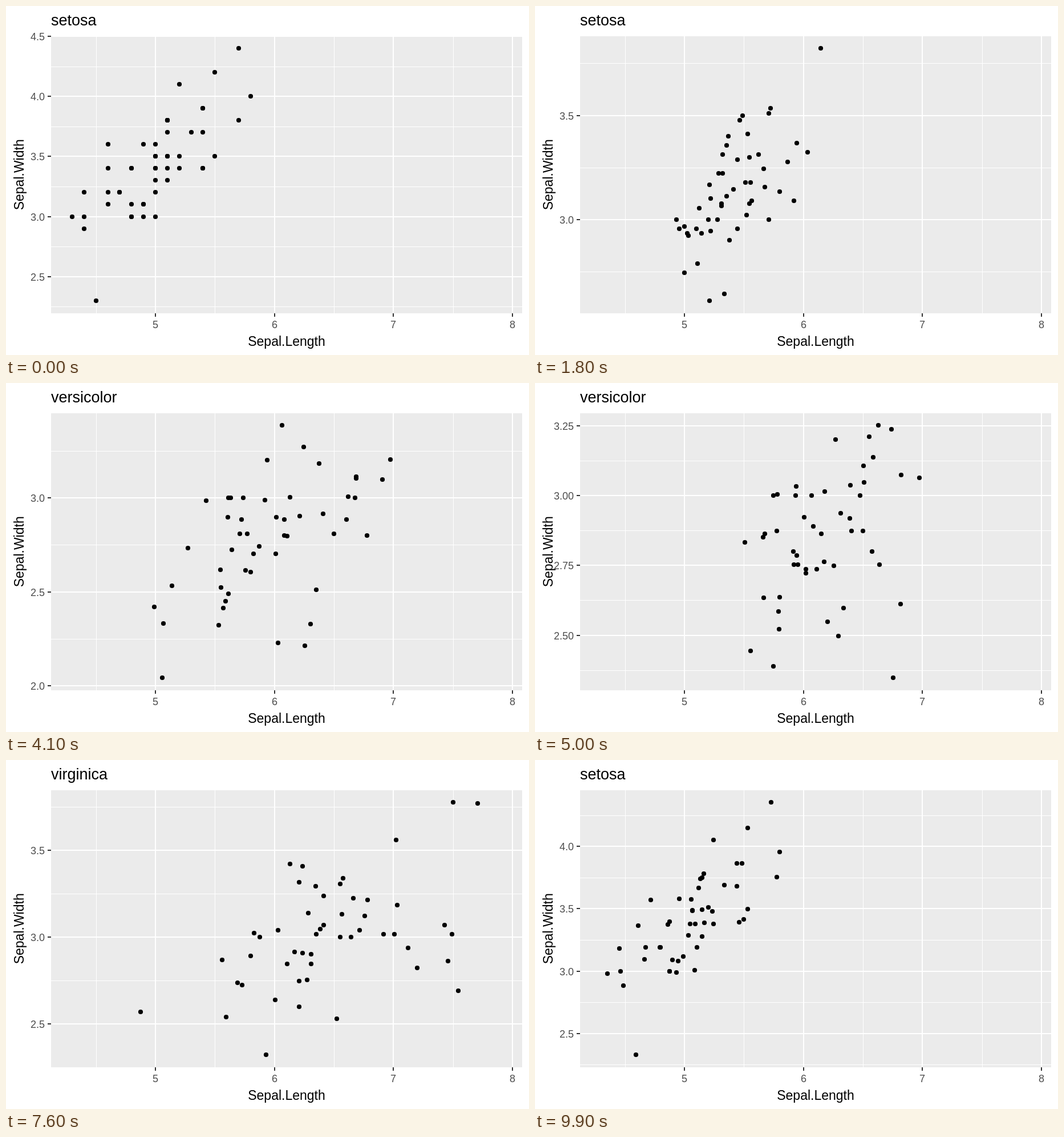
These frames come from a looping animation (917x611 px, 10 s). An HTML page:

```html
<!DOCTYPE html>
<html lang="en">
<head>
<meta charset="utf-8">
<title>Sepal scatter plot</title>
<style>
  html, body { margin: 0; width: 100%; height: 100%; overflow: hidden; background: #fff; }
  svg { display: block; font-family: "Liberation Sans", Arial, sans-serif; }
  .label { font-size: 18px; fill: #4d4d4d; }
  .name { font-size: 23px; text-anchor: middle; }
  .mid { text-anchor: middle; }
  .end { text-anchor: end; }
  .grid { fill: #fff; }
  .tick { fill: #333; }
</style>
</head>
<body>
<svg width="917" height="611" viewBox="0 0 917 611">
  <text id="title" x="79" y="34" font-size="27"></text>
  <rect x="79" y="53" width="826" height="485" fill="#ebebeb"/>
  <g id="minor" class="grid"></g>
  <g id="xAxis"></g>
  <g id="yAxis"></g>
  <g id="dots"></g>
  <text class="name" x="492" y="595">Sepal.Length</text>
  <text class="name" transform="translate(30.5 295.3) rotate(-90)">Sepal.Width</text>
</svg>
<script>
// Measurements in tenths, one entry per flower.
const setosaLength = [
  51,49,47,46,50,54,46,50,44,49,54,48,48,43,58,57,54,51,57,51,54,51,46,51,48,
  50,50,52,52,47,48,54,52,55,49,50,55,49,44,51,50,45,44,50,51,48,51,46,53,50];
const setosaWidth = [
  35,30,32,31,36,39,34,34,29,31,37,34,30,30,40,44,39,35,38,38,34,37,36,33,34,
  30,34,35,34,32,31,34,41,42,31,32,35,36,30,34,35,23,32,35,38,30,38,32,37,33];
const versicolorLength = [
  70,64,69,55,65,57,63,49,66,52,50,59,60,61,56,67,56,58,62,56,59,61,63,61,64,
  66,68,67,60,57,55,55,58,60,54,60,67,63,56,55,55,61,58,50,56,57,57,62,51,57];
const versicolorWidth = [
  32,32,31,23,28,28,33,24,29,27,20,30,22,29,29,31,30,27,22,25,32,28,25,28,29,
  30,28,30,29,26,24,24,27,27,30,34,31,23,30,25,26,30,26,23,27,30,29,29,25,28];
const virginicaLength = [
  63,58,71,63,65,76,49,73,67,72,65,64,68,57,58,64,65,77,77,60,69,56,77,63,67,
  72,62,61,64,72,74,79,64,63,61,77,63,64,60,69,67,69,58,68,67,67,63,65,62,59];
const virginicaWidth = [
  33,27,30,29,30,30,25,29,25,36,32,27,30,25,28,32,30,38,26,22,32,28,28,27,33,
  32,28,30,28,30,28,38,28,28,26,30,34,31,30,31,31,31,27,32,33,30,25,30,34,30];

// Each state leaves at step `from` and reaches the next one at step `to`.
const states = [
  { name: "setosa", x: setosaLength, y: setosaWidth, from: 6, to: 33 },
  { name: "versicolor", x: versicolorLength, y: versicolorWidth, from: 40, to: 67 },
  { name: "virginica", x: virginicaLength, y: virginicaWidth, from: 74, to: 100 }
];
const STEP_MS = 100, STEPS = 100;
const LEFT = 79, RIGHT = 905, TOP = 52.5, BOTTOM = 538.3;
const X_MIN = 4.12, X_MAX = 8.08;

const $ = id => document.getElementById(id);
const rect = (cls, x, y, w, h) =>
  `<rect class="${cls}" x="${x}" y="${y}" width="${w}" height="${h}"/>`;
const text = (cls, x, y, s) => `<text class="label ${cls}" x="${x}" y="${y}">${s}</text>`;
const hLine = (y, w) => rect("grid", 79, y - (w >> 1), 826, w);
const vLine = (x, w) => rect("grid", x - (w >> 1), 53, w, 485);
const xPos = v => Math.floor(LEFT + (v - X_MIN) / (X_MAX - X_MIN) * (RIGHT - LEFT));

// Extended Wilkinson labelling: the best scoring set of about five round breaks.
function niceBreaks(lo, hi) {
  const Q = [1, 5, 2, 2.5, 4, 3], wanted = 5;
  let best = { score: -Infinity };
  for (let j = 1; j <= 3; j++) Q.forEach((q, i) => {
    const simple = 1 - i / (Q.length - 1) - j;
    for (let k = 2; k <= 12; k++) for (let z = -2; z <= 0; z++) {
      const step = j * q * 10 ** z, span = step * (k - 1);
      const first = (Math.floor(hi / step) - (k - 1)) * j;
      const last = Math.ceil(lo / step) * j;
      for (let s = first; s <= last; s++) {
        const a = s * step / j, b = a + span;
        const cover = 1 - 0.5 * ((hi - b) ** 2 + (lo - a) ** 2) / (0.1 * (hi - lo)) ** 2;
        const ratio = (k - 1) / span * (Math.max(b, hi) - Math.min(a, lo)) / (wanted - 1);
        const dense = 2 - Math.max(ratio, 1 / ratio);
        const score = 0.25 * simple + 0.2 * cover + 0.5 * dense + 0.05;
        if (score > best.score + 1e-9) best = { score, a, step, k };
      }
    }
  });
  return best;
}

function pose(step) {
  const i = states.findIndex(s => step <= s.to);
  const a = states[i], b = states[(i + 1) % states.length];
  const p = Math.max(0, (step - a.from) / (a.to - a.from));
  const mix = key => a[key].map((v, n) => (v + (b[key][n] - v) * p) / 10);
  return { name: p > 0.5 ? b.name : a.name, xs: mix("x"), ys: mix("y") };
}

function draw(step) {
  const { name, xs, ys } = pose(step);
  const min = Math.min(...ys), max = Math.max(...ys), pad = (max - min) * 0.05;
  const lo = min - pad, hi = max + pad;
  const yPos = v => Math.floor(BOTTOM - (v - lo) / (hi - lo) * (BOTTOM - TOP));
  const inView = v => v >= lo && v <= hi;

  const { a, step: gap, k } = niceBreaks(lo, hi);
  const major = Array.from({ length: k }, (_, n) => a + n * gap).filter(inView);
  const minor = Array.from({ length: k + 1 }, (_, n) => a + (n - 0.5) * gap).filter(inView);
  const digits = [0, 1, 2].find(d => major.every(v => Math.abs(v - v.toFixed(d)) < 1e-6));

  $("title").textContent = name;
  $("minor").innerHTML = minor.map(v => hLine(yPos(v), 1)).join("") +
    [4.5, 5.5, 6.5, 7.5].map(v => vLine(xPos(v), 1)).join("");
  $("yAxis").innerHTML = major.map(v => {
    const y = yPos(v);
    return hLine(y, 2) + rect("tick", 73, y - 1, 6, 2) +
      text("end", 68, y + 6.5, v.toFixed(digits));
  }).join("");
  dots.forEach((dot, n) => {
    dot.setAttribute("cx", xPos(xs[n]));
    dot.setAttribute("cy", yPos(ys[n]));
  });
}

$("xAxis").innerHTML = [5, 6, 7, 8].map(v => {
  const x = xPos(v);
  return vLine(x, 2) + rect("tick", x - 1, 538, 2, 6) + text("mid", x, 564, v);
}).join("");
$("dots").innerHTML = setosaLength.map(() => '<circle r="4.1"/>').join("");
const dots = [...$("dots").children];

const start = performance.now();
let shown = -1;
function tick() {
  const step = Math.floor((performance.now() - start) / STEP_MS) % STEPS;
  if (step !== shown) draw(shown = step);
  requestAnimationFrame(tick);
}
tick();
</script>
</body>
</html>
```
